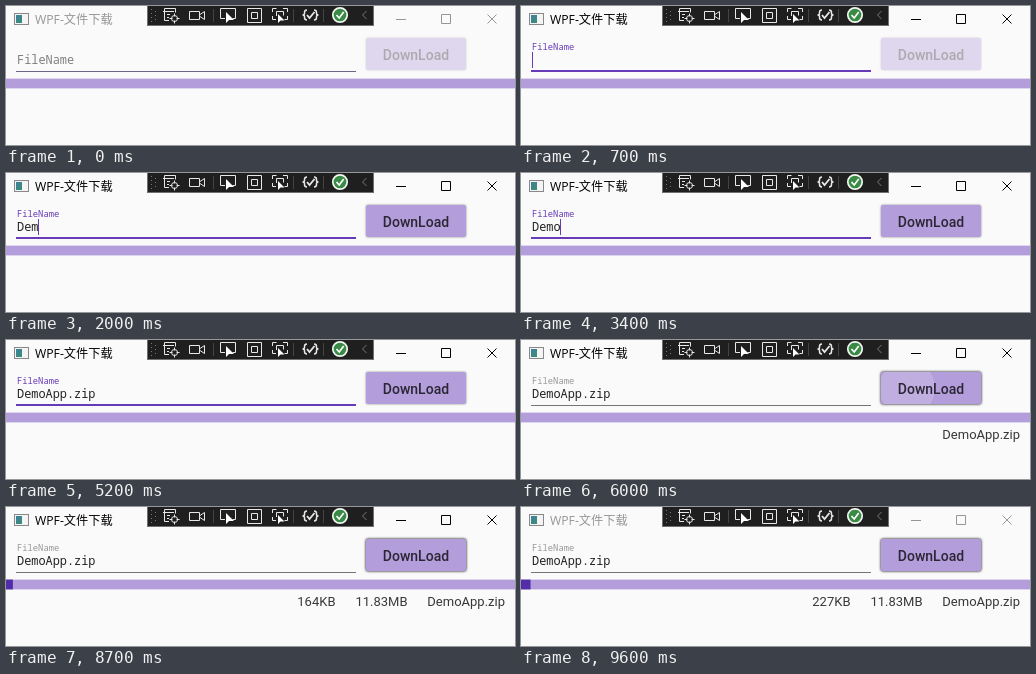
Recreate the animation shown at these times as an HTML page. Size 509 px wide and 139 px high, loop 9700 ms.

```html
<!DOCTYPE html>
<html lang="zh">
<head>
<meta charset="utf-8">
<title>WPF-文件下载</title>
<style>
  html, body { margin: 0; width: 100%; height: 100%; overflow: hidden; background: #fafafa; }
  svg { display: block; width: 509px; height: 139px; }
  svg * { animation-duration: 9.7s; animation-iteration-count: infinite; }
  .mono { font-family: "Noto Sans Mono", monospace; font-size: 11.9px; }
  .list { font: 13px Roboto, sans-serif; fill: #383838; text-anchor: end; }

  .chrome { fill: #969696; stroke: #969696; animation-name: activate; animation-timing-function: step-end; }
  .chrome text { font: 12.2px "Open Sans", "Noto Sans CJK SC", "Noto Sans CJK", sans-serif; stroke: none; }
  .chrome path { fill: none; }
  @keyframes activate {
    0%, 97.93% { fill: #969696; stroke: #969696; }
    4.12% { fill: #000; stroke: #000; }
  }

  .base { fill: #6d6384; animation-name: hoverLine; animation-timing-function: step-end; }
  @keyframes hoverLine {
    0% { fill: #6d6384; }
    1.03% { fill: #673ab7; }
    56.7%, 100% { fill: #757575; }
  }
  .focus { fill: #673ab7; transform-origin: 180px 65px; transform: scaleX(0); animation-name: focusLine; }
  @keyframes focusLine {
    0%, 4.12% { transform: scaleX(0); }
    7.21%, 56.69% { transform: scaleX(1); }
    58.76%, 100% { transform: scaleX(0); }
  }
  .hint { fill: #808080; transform: translate(11px, 58px); animation-name: float; }
  @keyframes float {
    0%, 4.12% { transform: translate(11px, 58px); fill: #808080; }
    7.21%, 56.69% { transform: translate(11px, 44px) scale(.74); fill: #673ab7; }
    58.76%, 99.99% { transform: translate(11px, 44px) scale(.74); fill: #979797; }
  }

  .button { opacity: .38; animation-name: enable; animation-timing-function: step-end; }
  @keyframes enable { 0% { opacity: .38; } 16.49%, 100% { opacity: 1; } }
  .button text { font: 500 14px Roboto, sans-serif; fill: #2b2634; text-anchor: middle; }
  .shadow { filter: drop-shadow(0 .7px 1.3px rgba(0, 0, 0, .45)); }
  .raised { opacity: 0; filter: drop-shadow(0 .7px 1.5px rgba(0, 0, 0, .75)); animation-name: raise; }
  @keyframes raise { 0%, 56% { opacity: 0; } 58.8%, 99.99% { opacity: 1; } }
  .ripple { fill: #fff; opacity: 0; transform-origin: 386px 48px; animation-name: ripple; }
  @keyframes ripple {
    0%, 59.79% { transform: scale(0); opacity: .18; }
    61.86% { transform: scale(1); opacity: .18; }
    64.9% { transform: scale(2.8); opacity: .12; }
    67%, 100% { transform: scale(2.8); opacity: 0; }
  }
</style>
</head>
<body>
<svg viewBox="0 0 509 139">
  <defs>
    <clipPath id="face"><rect x="360" y="32" width="100" height="32" rx="2"/></clipPath>
    <linearGradient id="screen" x2="1" y2="1">
      <stop stop-color="#3f7fa0"/><stop offset="1" stop-color="#3a8f70"/>
    </linearGradient>
  </defs>
  <rect width="509" height="139" fill="#fafafa"/>

  <!-- title bar -->
  <rect x="8.5" y="7.5" width="14" height="11" fill="#f4f4f4" stroke="#888"/>
  <rect x="10" y="9" width="6" height="8" fill="url(#screen)"/>
  <g class="chrome">
    <text x="29" y="17.5">WPF-文件下载</text>
    <path d="M390 13.5h10M435.5 8.5h9v9h-9zM481.5 8.5l9 9M490.5 8.5l-9 9"/>
  </g>

  <!-- debug toolbar -->
  <rect x="141.5" y="-.5" width="226" height="20" fill="#1f1f1f" stroke="#707070"/>
  <g fill="none" stroke="#e8e8e8">
    <path d="M145.5 3v14M149.5 5v12" stroke="#777" stroke-dasharray="1 3"/>
    <path d="M163 14.5h-4.5v-12h11v4M157 5.5h4M161 5.5h7M161 8.5h3M161 11.5h2"/>
    <circle cx="168.5" cy="12.5" r="3"/>
    <path d="M168.5 7.5v3M168.5 14.5v3M163.5 12.5h3M170.5 12.5h3"/>
    <path d="M183.5 5.5h10v8h-10zM194 8.5l4.5-3v8l-4.5-3"/>
    <path d="M207.5 3v13M287.5 3v13M317.5 3v13" stroke="#444"/>
    <path d="M219 12.5h-4.5v-10h15v10h-3"/>
    <path d="M220 6v11l3-3h5z" fill="#fff" stroke="none"/>
    <path d="M241.5 2.5h14v14h-14zM245.5 6.5h6v6h-6z"/>
    <path d="M266.5 6v-3.5h4M277 2.5h4.5v3.5M281.5 10v3.5h-3M270 13.5h-3.5v-3.5M270.5 10v-4.5h7v4"/>
    <path d="M272 8v9l2.5-2.5h4z" fill="#fff" stroke="none"/>
    <path d="M301 4q-2.5 0-2.5 2.500v1q0 1.500-2 1.500q2 0 2 1.500v1q0 2.500 2.500 2.500M308 4q2.500 0 2.500 2.500v1q0 1.500 2 1.500q-2 0-2 1.500v1q0 2.500-2.500 2.500" stroke-width="1.5"/>
    <path d="M301 9l2.500 3 5-6" stroke-width="1.800"/>
    <circle cx="334" cy="9" r="7.200" fill="#388a44" stroke="#f2f7f2" stroke-width="1.700"/>
    <path d="M330.500 9l2.700 3 4.500-6" stroke="#fff" stroke-width="1.700"/>
    <path d="M360.500 5l-4 4 4 4" stroke="#777"/>
  </g>

  <!-- file name field -->
  <rect class="base" x="10" y="65" width="340" height="1"/>
  <rect class="focus" x="10" y="64" width="340" height="2"/>
  <text class="mono hint">FileName</text>
  <text class="mono" id="typed" x="11" y="58" fill="#222"></text>
  <rect id="caret" y="46" width="1" height="16" fill="#673ab7"/>

  <!-- download button -->
  <g class="button">
    <rect class="raised" x="360" y="32" width="100" height="32" rx="2" fill="#b39ddb"/>
    <rect class="shadow" x="360" y="32" width="100" height="32" rx="2" fill="#b39ddb"/>
    <g clip-path="url(#face)"><circle class="ripple" cx="386" cy="48" r="28"/></g>
    <text x="410" y="54">DownLoad</text>
  </g>

  <!-- progress -->
  <rect y="72.6" width="509" height="9.8" fill="#b39ddb"/>
  <rect id="bar" y="72.6" width="0" height="9.8" fill="#512da8"/>
  <g class="list">
    <text id="loaded" x="329.5" y="99"></text>
    <text id="total" x="401.5" y="99"></text>
    <text id="file" x="499" y="99"></text>
  </g>
</svg>
<script>
  const LOOP = 9700, NAME = 'DemoApp.zip', TOTAL_MB = 11.83;
  const keyTimes = [1600, 1800, 2000, 2300, 3500, 3800, 3900, 4100, 4300, 4400, 4700];
  const caretOff = [[0, 500], [1000, 1400], [2900, 3400], [5200, LOOP]];
  const $ = id => document.getElementById(id);
  const setText = (id, text) => {
    const el = $(id);
    if (el.textContent !== text) el.textContent = text;
  };

  function render(t) {
    const count = keyTimes.filter(k => k <= t).length;
    setText('typed', NAME.slice(0, count));
    $('caret').setAttribute('x', Math.floor(11 + 7.15 * count));
    $('caret').style.opacity = caretOff.some(([a, b]) => t >= a && t < b) ? 0 : 1;

    // The counter refreshes ten times a second.
    const tick = Math.floor(t / 100) * 100;
    const started = tick >= 6400;
    const kb = started ? Math.floor(67 + (tick - 7300) * 0.0696) : 0;
    setText('file', t >= 6000 ? NAME : '');
    setText('total', started ? TOTAL_MB + 'MB' : '');
    setText('loaded', started ? kb + 'KB' : '');
    $('bar').setAttribute('width', kb / (TOTAL_MB * 1024) * 509);
  }

  function loop() {
    render(performance.now() % LOOP);
    requestAnimationFrame(loop);
  }
  loop();
</script>
</body>
</html>
```
